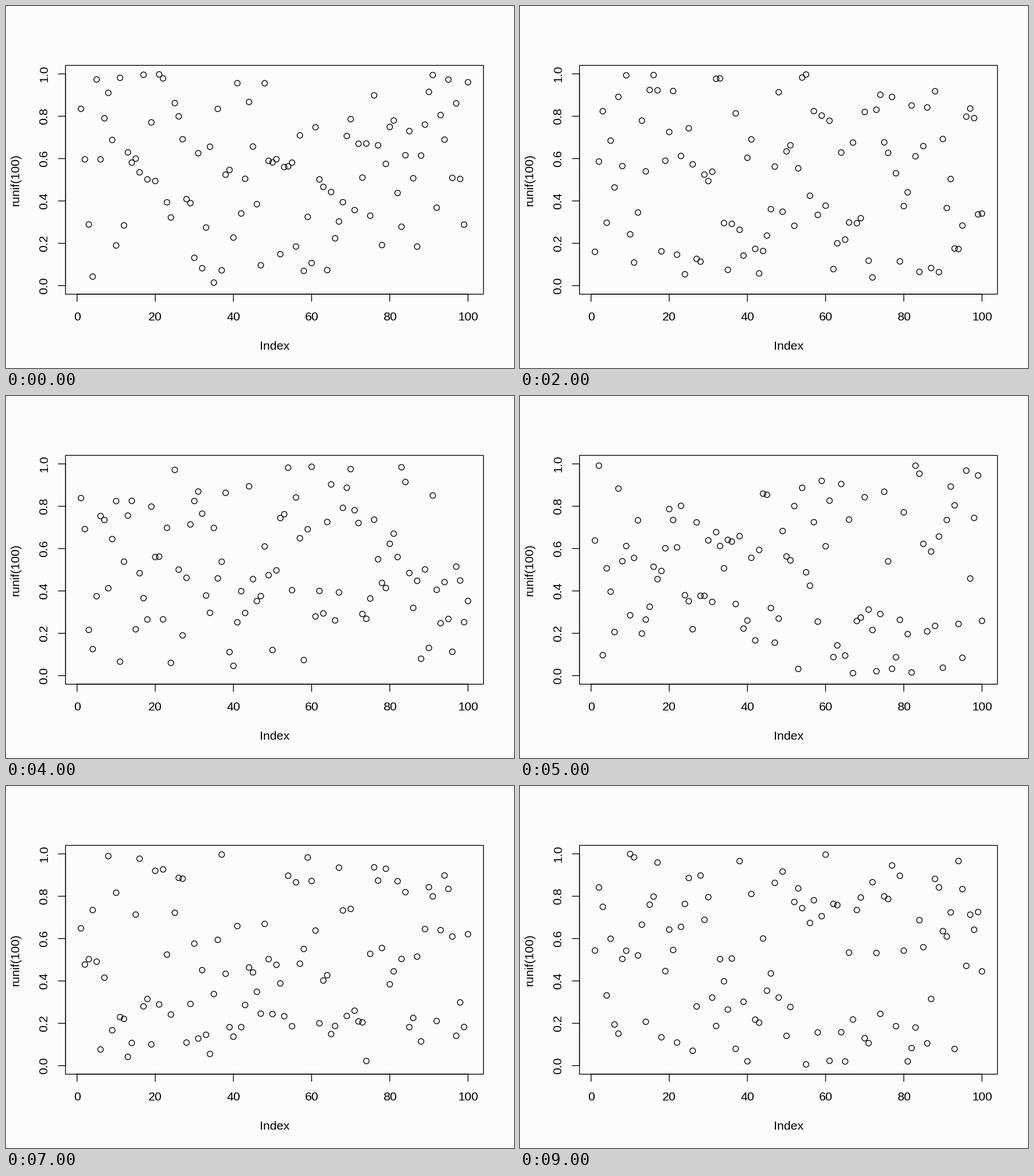
A matplotlib script that plays this animation: 885x632 px, repeating every 10000 ms.

```python
import numpy as np
import matplotlib.pyplot as plt
from matplotlib.animation import FuncAnimation
from matplotlib.patches import Rectangle

W, H, DPI = 885, 632, 100
PX = 72 / DPI
INK, PAPER = "black", "#fcfcfe"
LEFT, RIGHT, TOP, BOTTOM = 103.6, 831.8, 103.6, 503.2
TICK = 12.6
LINE = 1.35 * PX
N, STEPS = 100, 10

plt.rcParams["font.family"] = "Liberation Sans"


def px_x(v):
    return 123.8 + 6.81 * v


def px_y(v):
    return 488.3 - 369.8 * v


def sample(step):
    """Pixel heights of one draw of 100 uniform numbers."""
    return px_y(np.random.default_rng(100 + step).random(N))


fig = plt.figure(figsize=(W / DPI, H / DPI), dpi=DPI, facecolor=PAPER)
ax = fig.add_axes([0, 0, 1, 1])
ax.set_xlim(0, W)
ax.set_ylim(H, 0)
ax.axis("off")


def line(xs, ys):
    ax.plot(xs, ys, color=INK, lw=LINE, solid_capstyle="round", snap=False)


def label(x, y, text, angle=0):
    ax.text(x, y, text, size=21.3 * PX, color=INK, ha="center", va="baseline",
            rotation=angle, rotation_mode="anchor")


ax.add_patch(Rectangle((LEFT, TOP), RIGHT - LEFT, BOTTOM - TOP, fill=False,
                       ec=INK, lw=LINE, snap=False))

# Axis lines lie over the box and darken its edge
line([px_x(0), px_x(100)], [BOTTOM] * 2)
line([LEFT] * 2, [px_y(0), px_y(1)])

for v in range(0, 101, 20):
    line([px_x(v)] * 2, [BOTTOM, BOTTOM + TICK])
    label(px_x(v), 548.6, str(v))
    line([LEFT - TICK, LEFT], [px_y(v / 100)] * 2)
    label(72.6, px_y(v / 100), f"{v / 100:.1f}", 90)

label(467.8, 599.6, "Index")
label(22.2, 303.4, "runif(100)", 90)

xs = px_x(np.arange(1, N + 1))
dots = ax.scatter(xs, sample(0), s=(9.7 * PX) ** 2, facecolors="none",
                  edgecolors=INK, linewidths=LINE, snap=False, zorder=3)


def update(step):
    dots.set_offsets(np.column_stack([xs, sample(step)]))
    return (dots,)


anim = FuncAnimation(fig, update, frames=STEPS, interval=1000, repeat=True,
                     repeat_delay=0, blit=False)
plt.show()
```
